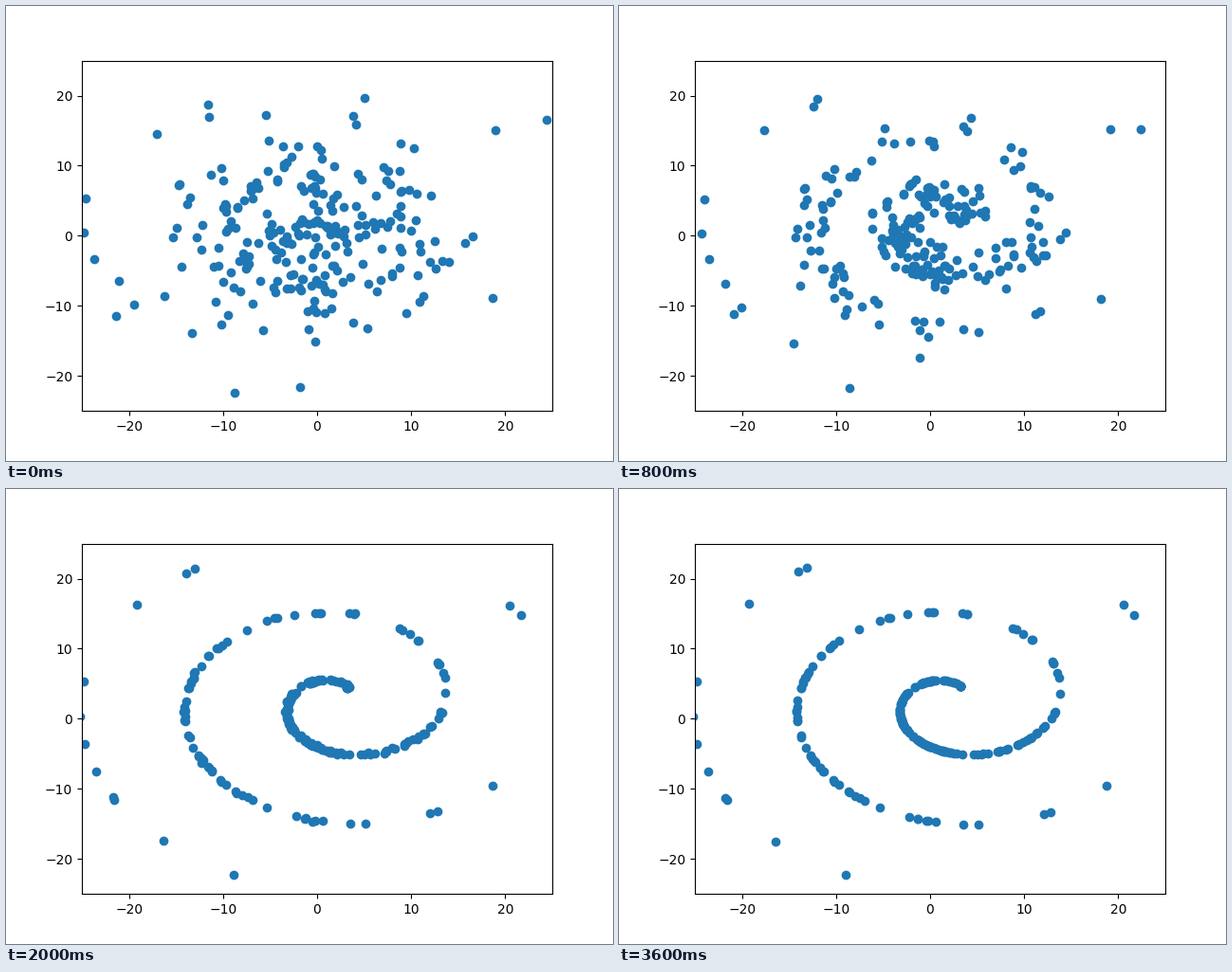
Write a matplotlib script that moves like this. It is 640 by 480 pixels and loops after 4 s.

```python
import numpy as np
import matplotlib.pyplot as plt
from matplotlib.animation import FuncAnimation

FRAMES, STEP = 20, 200
MARK = 2  # frame at which the cloud has contracted and starts to settle
CROWD = 228
REACH = 17  # radius of the crowd

# Lone points outside the crowd, at the contracted stage
OUTER = [(-11.3, 18.3), (-11.3, 16.8), (-16.6, 14.1), (18.3, 14.5),
         (22.8, 15.5), (-23.7, 0.4), (-23.5, 5.1), (-22.7, -3.2),
         (-20.5, -6.3), (-20.4, -10.9), (-18.9, -9.6), (-13.2, -13.8),
         (-8.4, -21.3), (-1.5, -19.4), (17.8, -8.6), (4.6, 18)]


def spiral(n=2400):
    a = np.linspace(1.3, 17.1, n)
    return np.column_stack([2.6 + 1.77 * a * np.cos(a),
                            2.6 + 1.6 * a * np.sin(a)])


def crowd():
    rng = np.random.default_rng(7)
    pts = rng.normal((0, 1.5), (7.8, 7.2), (2 * CROWD, 2))
    return pts[np.hypot(*pts.T) < REACH][:CROWD]


def nearest(pts, curve):
    dist = ((pts[:, None] - curve[None]) ** 2).sum(axis=2)
    return curve[dist.argmin(axis=1)]


mid = np.vstack([OUTER, crowd()])
goal = nearest(mid, spiral())
start = 1.06 * mid + 0.2 * (mid - goal)


def positions(i):
    i = min(i, FRAMES - 2)
    if i < MARK:
        return start + (mid - start) * i / MARK
    fade = np.exp(-0.51 * ((i - MARK) / 2) ** 1.32)
    return goal + (mid - goal) * fade


fig, ax = plt.subplots(figsize=(6.4, 4.8), dpi=100)
dots = ax.scatter(*start.T)
ax.set_xlim(-25, 25)
ax.set_ylim(-25, 25)
ax.set_xticks(range(-20, 21, 10))
ax.set_yticks(range(-20, 21, 10))


def update(i):
    dots.set_offsets(positions(i))
    return (dots,)


anim = FuncAnimation(fig, update, frames=FRAMES, interval=STEP,
                     repeat=True, repeat_delay=0)
plt.show()
```
